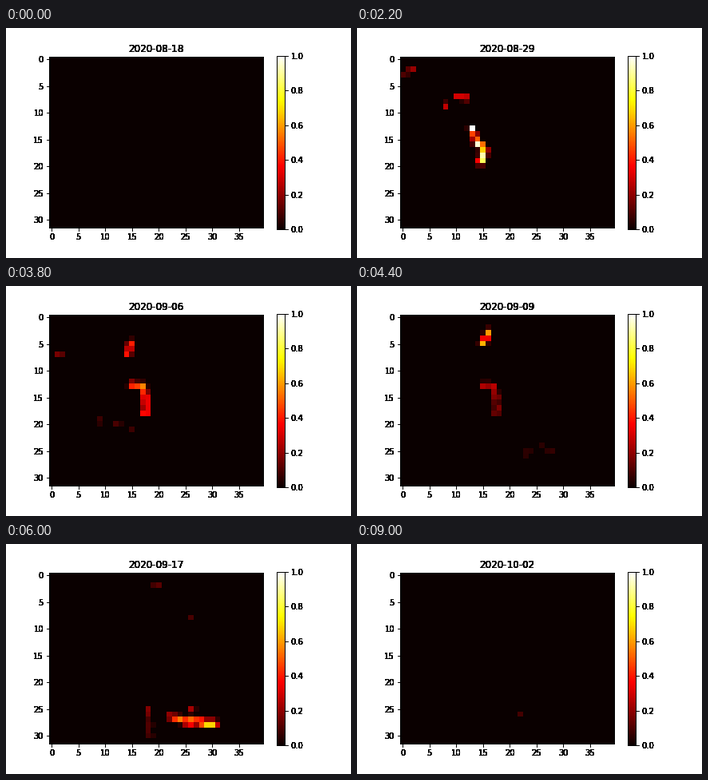
Animation of 432x288 px, one loop 10 s. Source, as a matplotlib script:

```python
import matplotlib.pyplot as plt
import numpy as np
from matplotlib.animation import FuncAnimation
from matplotlib.lines import Line2D
from matplotlib.spines import Spine
from matplotlib.text import Text

ROWS, COLS = 32, 40
LAST_DAY, HOLD = 45, 5
START_DATE = np.datetime64("2020-08-18")
CELL_ROWS, CELL_COLS = np.mgrid[:ROWS, :COLS]

plt.rcParams.update({"figure.subplot.bottom": 0.125, "font.family": "DejaVu Sans"})


def trace(points, samples=60):
    """Spread samples evenly over the legs of a (column, row) polyline."""
    cols, rows = np.array(points, float).T
    steps = np.linspace(0, len(cols) - 1, samples)
    knots = np.arange(len(cols))
    return np.array([np.interp(steps, knots, cols), np.interp(steps, knots, rows)])


class Fire:
    """A burning front that drifts between poses: {day: (heat, points)}."""

    def __init__(self, start, end, poses):
        days = sorted(poses)
        heats = [poses[day][0] for day in days]
        fronts = [trace(poses[day][1]) for day in days]
        self.days = [start, *days, end]
        self.heats = [0, *heats, 0]
        self.fronts = [fronts[0], *fronts, fronts[-1]]

    def glow(self, day):
        heat = np.interp(day, self.days, self.heats)
        if heat == 0:
            return np.zeros((ROWS, COLS))
        k = min(np.searchsorted(self.days, day, side="right"), len(self.days) - 1)
        before, after = self.days[k - 1], self.days[k]
        mix = (day - before) / (after - before)
        cols, rows = (1 - mix) * self.fronts[k - 1] + mix * self.fronts[k]
        distance = np.hypot(CELL_COLS[..., None] - cols, CELL_ROWS[..., None] - rows)
        return heat * np.exp(-((distance.min(axis=-1) / 0.6) ** 2))


def spot(day, col, row, heat):
    return Fire(day - 3, day + 3, {day: (heat, [(col, row)])})


northwest = Fire(0, 21, {
    5: (0.9, [(1.5, 3.8), (1.2, 5.4)]),
    11: (0.2, [(0, 3), (2, 2)]),
    19: (0.2, [(1, 7), (2, 7)]),
})
north = Fire(0, 33, {
    5: (0.7, [(8.6, 8.8), (10, 10.6), (11.6, 12.7)]),
    11: (0.4, [(10.2, 7), (12, 7.4)]),
    19: (0.7, [(14.7, 4.8), (14.3, 6.8)]),
    26: (0.9, [(17.8, 0.4), (17.3, 1.6), (15.5, 2.7)]),
    30: (0.12, [(19, 2), (20, 2)]),
})
arc = Fire(0, 24, {
    5: (0.8, [(11.3, 15.2), (13.3, 17.3), (11.5, 20.4), (8.8, 18.8)]),
    11: (1.1, [(13, 13.2), (13.8, 15.5), (15.4, 17.2), (14.5, 19.3)]),
    19: (0.8, [(15, 12.7), (17, 13), (17.5, 15), (17.5, 17.8)]),
})
south = Fire(24, 34, {
    26: (0.8, [(18.9, 25.3), (18.8, 28), (18.8, 30.5)]),
    30: (0.2, [(18, 24.8), (18.4, 29.7)]),
})
southeast = Fire(21, 36, {
    26: (0.4, [(22.7, 26), (25, 23.3), (27.8, 25)]),
    30: (0.9, [(22.5, 26.5), (25, 27.3), (30.5, 27.8)]),
})
east = Fire(22, 29, {
    24: (0.15, [(35, 19), (39, 23)]),
    26: (0.3, [(31.5, 16.7), (33, 20.5), (37, 24.6)]),
})
spots = [
    spot(11, 7.8, 8.7, 0.4),
    spot(19, 9.2, 19.4, 0.18),
    spot(19, 12.4, 20, 0.14),
    spot(19, 15.3, 21.5, 0.18),
    spot(26, 15.7, 22, 0.12),
    spot(26, 26, 9, 0.25),
    spot(30, 25.8, 8, 0.15),
    spot(30, 26.3, 25.3, 0.4),
    spot(39, 14, 16, 0.12),
    spot(45, 22, 26, 0.1),
]
fires = [northwest, north, arc, south, southeast, east, *spots]


def heat_map(day):
    flicker = np.random.default_rng(day).uniform(0.5, 1.1, (ROWS, COLS))
    heat = flicker * np.max([fire.glow(day) for fire in fires], axis=0)
    return np.where(heat > 0.04, heat, 0)


def draw_solid(artist):
    """Repeat the drawing so that soft edges turn solid black."""
    draw = artist.draw
    passes = 16 if isinstance(artist, Text) else 5

    def repeated(renderer):
        for _ in range(passes):
            draw(renderer)

    artist.draw = repeated


fig, ax = plt.subplots(figsize=(6, 4), dpi=72, facecolor="white")
image = ax.imshow(heat_map(0), cmap="hot", vmin=0, vmax=1, interpolation="nearest")
fig.colorbar(image, ticks=np.linspace(0, 1, 6))
ax.set_xticks(range(0, COLS, 5))
ax.set_yticks(range(0, ROWS, 5))
title = ax.set_title(str(START_DATE))

fig.canvas.draw()
for artist in fig.findobj(lambda a: isinstance(a, (Text, Line2D, Spine))):
    draw_solid(artist)


def update(frame):
    day = min(frame, LAST_DAY)
    image.set_data(heat_map(day))
    title.set_text(str(START_DATE + day))
    return image, title


anim = FuncAnimation(fig, update, frames=LAST_DAY + HOLD, interval=200, repeat=True)
plt.show()
```
